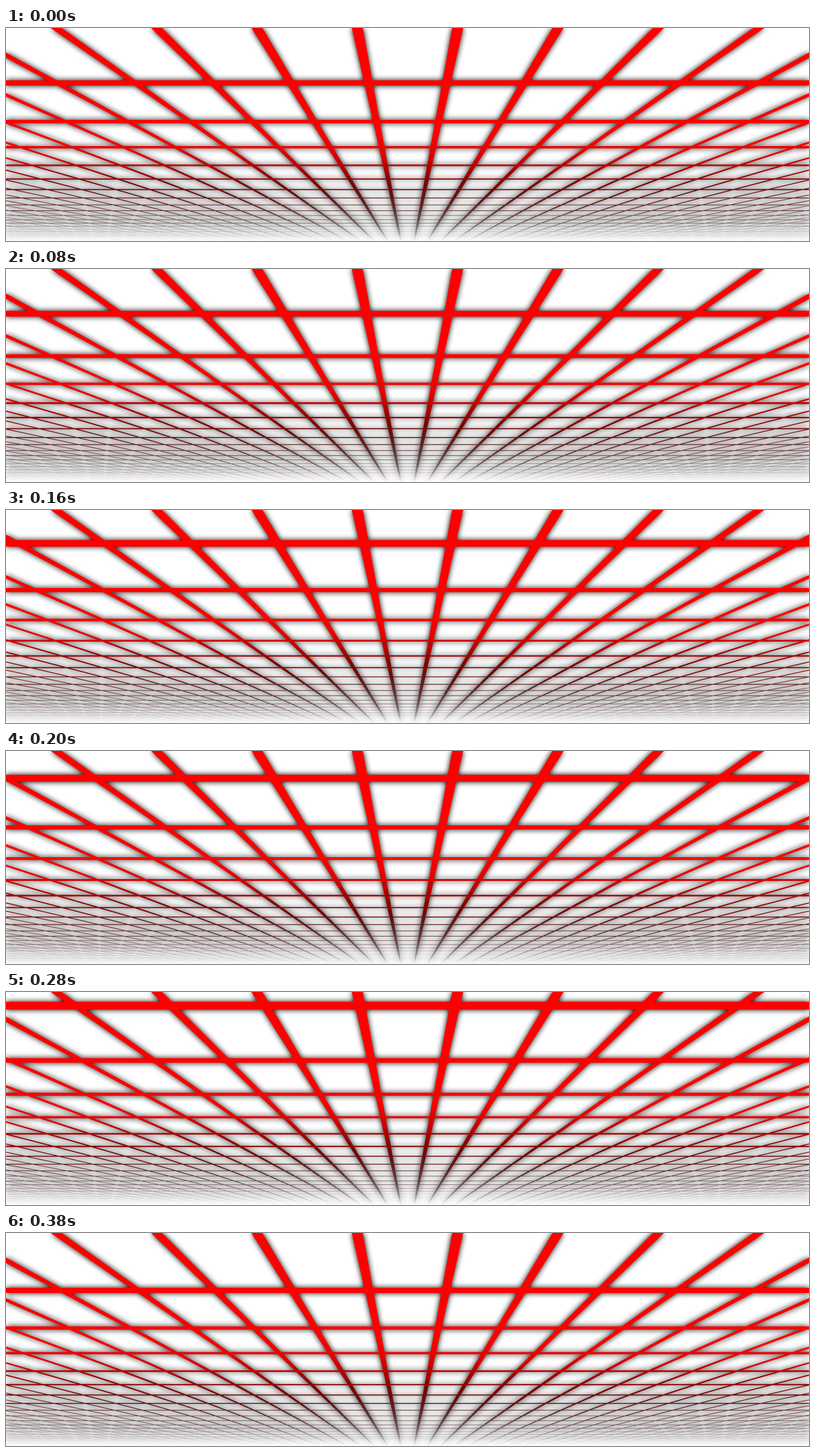
An HTML page with a canvas for the animation above (400 ms loop, 1280x341 px).

```html
<!DOCTYPE html>
<html lang="en">
<head>
<meta charset="utf-8">
<title>Perspective grid</title>
<style>
html, body { margin: 0; width: 100%; height: 100%; overflow: hidden; background: #fff; }
canvas { display: block; }
</style>
</head>
<body>
<canvas id="view" width="1280" height="341"></canvas>
<script>
const W = 1280, H = 341;
const HORIZON = 393;
const LOOP = 400, STEP = 20;
const ROW = 0.000833;        // row spacing in 1 / (distance below the horizon)
const START = 0.003279;      // nearest row at time zero
const COL = 160 / HORIZON;   // column spacing per pixel of distance
const HALF = 0.055;          // half line width, as a share of one cell

const ctx = document.getElementById('view').getContext('2d');
const layer = document.createElement('canvas');
layer.width = W;
layer.height = H;
const grid = layer.getContext('2d');

const fade = grid.createLinearGradient(0, 0, 0, H);
[
  [170, '255,0,0,1'],
  [200, '230,0,0,1'],
  [225, '175,0,0,1'],
  [248, '130,0,0,1'],
  [270, '100,18,18,1'],
  [292, '95,48,48,1'],
  [314, '105,80,80,.88'],
  [328, '120,105,105,.5'],
  [341, '140,140,140,0']
].forEach(([y, c]) => fade.addColorStop(y / H, `rgba(${c})`));

const rowY = u => HORIZON - 1 / u;

function addRows(path, phase) {
  for (let i = -2; i < 24; i++) {
    const u = START + (i - phase) * ROW;
    const top = rowY(u - HALF * ROW);
    path.rect(0, top, W, rowY(u + HALF * ROW) - top);
  }
}

function addColumns(path) {
  const near = HORIZON * COL, far = (HORIZON - H) * COL;
  for (let k = -34; k < 34; k++) {
    const a = k + 0.5 - HALF, b = k + 0.5 + HALF;
    path.moveTo(W / 2 + a * near, 0);
    path.lineTo(W / 2 + b * near, 0);
    path.lineTo(W / 2 + b * far, H);
    path.lineTo(W / 2 + a * far, H);
    path.closePath();
  }
}

function draw(time) {
  const phase = Math.floor((time % LOOP) / STEP) * STEP / LOOP;
  const path = new Path2D();
  addRows(path, phase);
  addColumns(path);

  grid.clearRect(0, 0, W, H);
  grid.fillStyle = fade;
  grid.fill(path);

  ctx.shadowColor = 'transparent';
  ctx.fillStyle = '#fff';
  ctx.fillRect(0, 0, W, H);
  ctx.shadowColor = '#000';
  ctx.shadowBlur = 10;
  ctx.drawImage(layer, 0, 0);
}

const origin = performance.now();
function tick() {
  draw(performance.now() - origin);
  requestAnimationFrame(tick);
}
tick();
</script>
</body>
</html>
```
